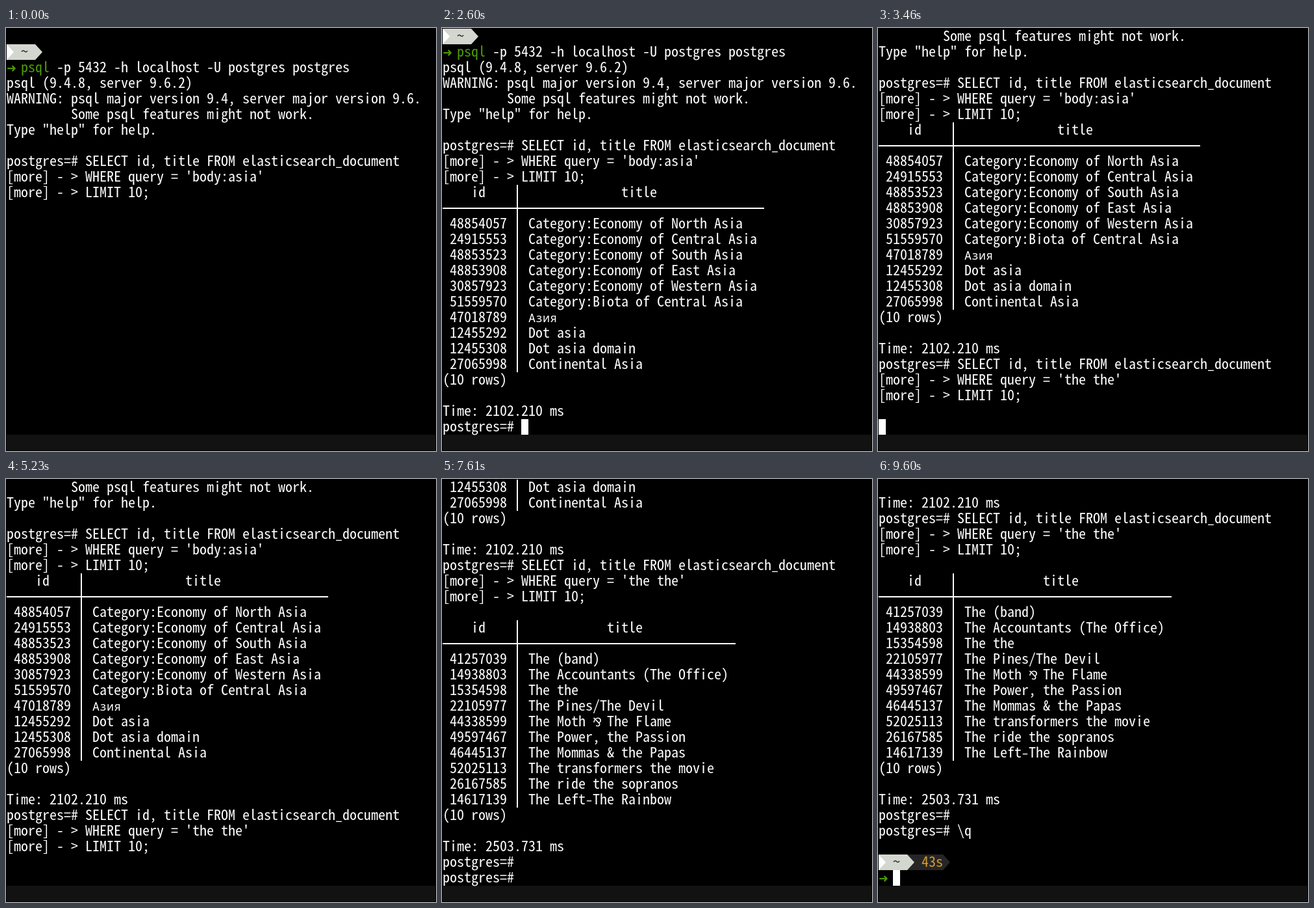
An HTML page with a canvas for the animation above (9890 ms loop, 662 by 650 pixels).

```html
<!DOCTYPE html>
<html lang="en">
<head>
<meta charset="utf-8">
<title>Terminal session</title>
<style>
  html, body { margin: 0; width: 100%; height: 100%; overflow: hidden; background: #000; }
  canvas { display: block; }
</style>
</head>
<body>
<canvas id="screen" width="662" height="650"></canvas>
<script>
const ctx = document.getElementById('screen').getContext('2d');
const LOOP = 9890, ROWS = 26, CELL_W = 11, CELL_H = 24, LEFT = 1, TOP = 1, BASELINE = 19;
const WHITE = '#fff', GREEN = '#4e9a06', SEGMENT = '#d3d7cf', DARK = '#262626', AMBER = '#d79b2f';

// Choose the font size whose advance is exactly one cell.
function fitFont(family) {
  ctx.font = `100px ${family}`;
  return `${CELL_W / ctx.measureText('0').width * 100}px ${family}`;
}
const MONO = fitFont('"Noto Sans Mono CJK JP", "Noto Sans Mono CJK SC", "Noto Sans Mono", monospace');
const MONO_WIDE = fitFont('"Noto Sans Mono", monospace');
const SYMBOL = '18px "DejaVu Sans", sans-serif';

const query = term => [
  'postgres=# SELECT id, title FROM elasticsearch_document',
  `[more] - > WHERE query = '${term}'`,
  '[more] - > LIMIT 10;',
];

function table(width, titleCol, rows, time) {
  return [
    '    id    │'.padEnd(titleCol) + 'title',
    '─'.repeat(10) + '┼' + '─'.repeat(width - 11),
    ...rows.map(([id, title]) => ` ${id} │ ${title}`),
    '(10 rows)',
    '',
    `Time: ${time} ms`,
  ];
}

const lines = [
  '',
  y => drawPrompt(y),
  '➜ psql -p 5432 -h localhost -U postgres postgres',
  'psql (9.4.8, server 9.6.2)',
  'WARNING: psql major version 9.4, server major version 9.6.',
  '         Some psql features might not work.',
  'Type "help" for help.',
  '',
  ...query('body:asia'),
  ...table(45, 25, [
    [48854057, 'Category:Economy of North Asia'],
    [24915553, 'Category:Economy of Central Asia'],
    [48853523, 'Category:Economy of South Asia'],
    [48853908, 'Category:Economy of East Asia'],
    [30857923, 'Category:Economy of Western Asia'],
    [51559570, 'Category:Biota of Central Asia'],
    [47018789, 'Азия'],
    [12455292, 'Dot asia'],
    [12455308, 'Dot asia domain'],
    [27065998, 'Continental Asia'],
  ], '2102.210'),
  ...query('the the'),
  '',
  ...table(41, 23, [
    [41257039, 'The (band)'],
    [14938803, 'The Accountants (The Office)'],
    [15354598, 'The the'],
    [22105977, 'The Pines/The Devil'],
    [44338599, 'The Moth ⅋ The Flame'],
    [49597467, 'The Power, the Passion'],
    [46445137, 'The Mommas & the Papas'],
    [52025113, 'The transformers the movie'],
    [26167585, 'The ride the sopranos'],
    [14617139, 'The Left–The Rainbow'],
  ], '2503.731'),
  'postgres=#',
  'postgres=# \\q',
  '',
  y => drawPrompt(y, '43s'),
  '➜ ',
];

// Output progress: [start ms, cursor line, cursor column]
const progress = [
  [0, 10, 20], [250, 11, 0], [2330, 26, 11], [3010, 29, 0],
  [3460, 30, 0], [5490, 46, 11], [9560, 46, 13], [9600, 49, 2],
];
// The cursor starts hidden and flips at each of these times.
const blinks = [180, 820, 1440, 2010, 2600, 3310, 3460, 4030, 4630, 5230,
  5490, 5490, 5820, 6420, 7010, 7610, 8200, 8800, 9400];

function rect(x, y, w, h, color) {
  ctx.fillStyle = color;
  ctx.fillRect(x, y, w, h);
}

function arrowhead(col, y, color) {
  const x = LEFT + col * CELL_W;
  ctx.fillStyle = color;
  ctx.beginPath();
  ctx.moveTo(x, y);
  ctx.lineTo(x + CELL_W, y + CELL_H / 2);
  ctx.lineTo(x, y + CELL_H);
  ctx.fill();
}

function drawChar(ch, col, y, color) {
  const x = LEFT + col * CELL_W;
  if ('─┼'.includes(ch)) rect(x, y + 11, CELL_W, 2, color);
  if ('│┼'.includes(ch)) rect(x + 4, y, 2, CELL_H, color);
  if (' ─┼│'.includes(ch)) return;
  ctx.font = '➜⅋'.includes(ch) ? SYMBOL : ch < '\x7f' ? MONO : MONO_WIDE;
  ctx.fillStyle = color;
  ctx.fillText(ch, x, y + BASELINE);
}

function drawText(text, col, y, color = WHITE) {
  const greenCols = text[0] === '➜' ? 6 : 0;
  [...text].forEach((ch, i) => drawChar(ch, col + i, y, i < greenCols ? GREEN : color));
}

function drawPrompt(y, elapsed) {
  if (elapsed) {
    rect(LEFT + 4 * CELL_W, y, 5 * CELL_W, CELL_H, DARK);
    arrowhead(9, y, DARK);
    drawText(elapsed, 6, y, AMBER);
  }
  rect(LEFT, y, 4 * CELL_W, CELL_H, SEGMENT);
  arrowhead(0, y, WHITE);
  arrowhead(4, y, SEGMENT);
  drawText('~', 2, y, '#303030');
}

function draw(t) {
  const [, last, col] = progress.filter(([start]) => start <= t).pop();
  const first = Math.max(0, last - ROWS + 1);
  const rowY = line => TOP + (line - first) * CELL_H;

  rect(0, 0, 662, 650, '#000');
  rect(1, 625, 660, 24, '#121212');
  for (let i = first; i <= last; i++) {
    const line = lines[i];
    if (typeof line === 'function') line(rowY(i));
    else drawText(i === last ? line.slice(0, col) : line, 0, rowY(i));
  }
  if (blinks.filter(time => time <= t).length % 2) {
    rect(LEFT + col * CELL_W, rowY(last), CELL_W, CELL_H, WHITE);
  }
}

const began = performance.now();
function tick() {
  draw((performance.now() - began) % LOOP);
  requestAnimationFrame(tick);
}
tick();
</script>
</body>
</html>
```
